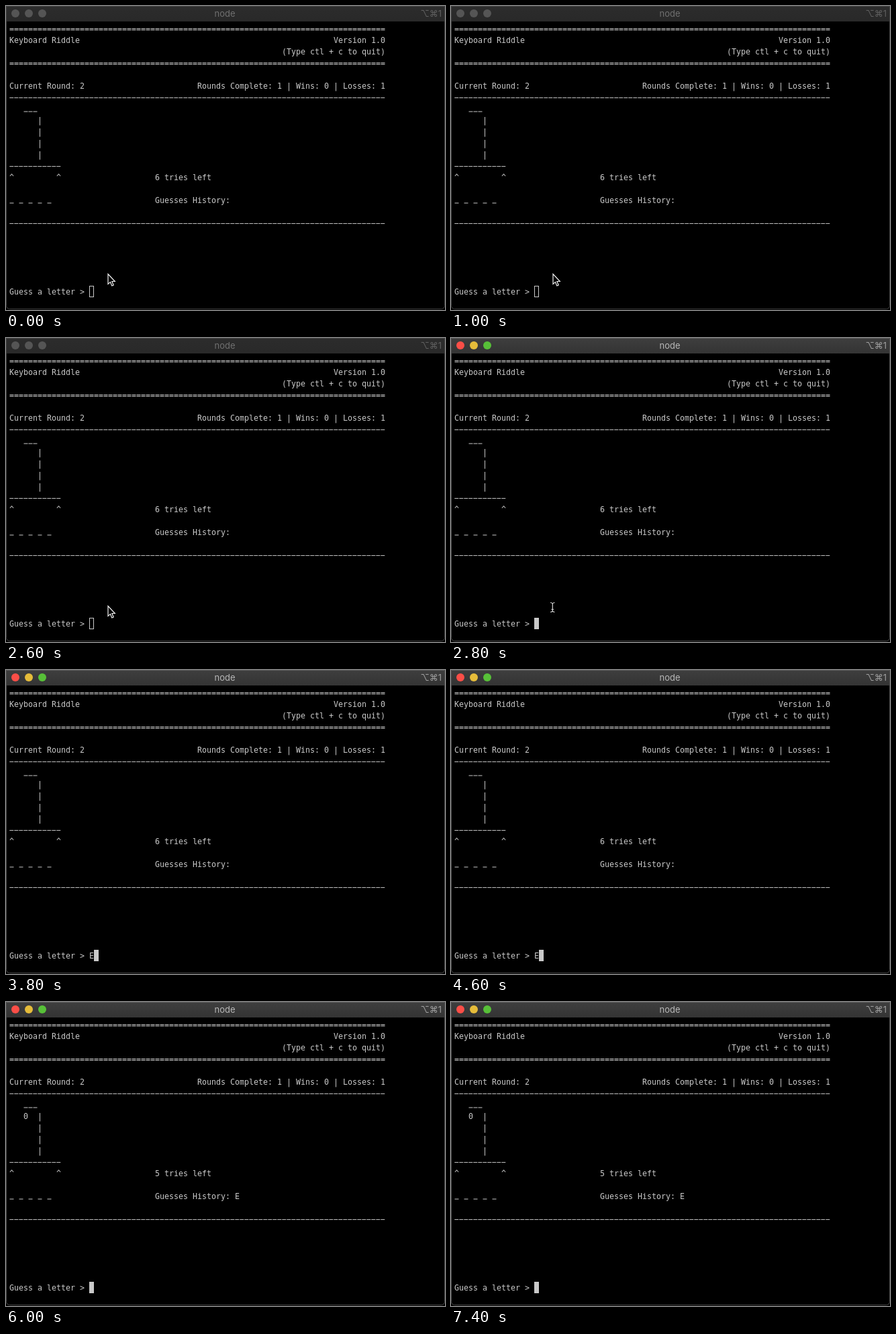
These frames come from a looping animation (654 px wide and 452 px high, 8 s). An HTML page with a canvas:

```html
<!DOCTYPE html>
<html lang="en">
<head>
<meta charset="utf-8">
<title>Terminal word game</title>
<style>
  html, body { margin: 0; width: 100%; height: 100%; overflow: hidden; background: #000; }
  canvas { display: block; }
</style>
</head>
<body>
<canvas id="stage" width="654" height="452"></canvas>
<script>
const ctx = document.getElementById('stage').getContext('2d');
const LOOP = 8000, FOCUS = 2800, TYPE = 3600, ENTER = 4800;
const COLS = 80, CELL = 7, ROW = 17, LEFT = 5, BASE = 38;
const INK = '#c9c9c9';
const PROMPT = 'Guess a letter > ';

const colX = col => LEFT + col * CELL;

// Writes text on the character grid; blanks and rules sit in their own cells.
function write(row, col, text) {
  const y = BASE + row * ROW;
  ctx.fillStyle = INK;
  ctx.font = '11.63px "DejaVu Sans Mono", monospace';
  ctx.textAlign = 'left';
  [...text].forEach((char, i) => {
    const x = colX(col + i);
    if (char === '_') ctx.fillRect(x + 0.5, y - 0.5, 6, 1);
    else if (char !== ' ') ctx.fillText(char === '-' ? '\u2212' : char, x, y);
  });
}

const writeRight = (row, text) => write(row, COLS - text.length, text);
const rule = (row, char) => write(row, 0, char.repeat(COLS));

function drawTitleBar(active) {
  const shade = ctx.createLinearGradient(0, 0, 0, 23);
  shade.addColorStop(0, active ? '#3e3e3e' : '#2c2c2c');
  shade.addColorStop(1, active ? '#343434' : '#292929');
  ctx.fillStyle = shade;
  ctx.fillRect(0, 0, 654, 23);
  ctx.fillStyle = active ? '#5c5c5c' : '#444';
  ctx.fillRect(0, 0, 654, 1);

  ['#fb4e47', '#e5bc3a', '#57c038'].forEach((color, i) => {
    ctx.fillStyle = active ? color : '#555';
    ctx.beginPath();
    ctx.arc(14 + 20 * i, 11, 6, 0, Math.PI * 2);
    ctx.fill();
  });

  ctx.font = '13px Inter, sans-serif';
  ctx.textAlign = 'center';
  ctx.fillStyle = active ? '#b8b8b8' : '#707070';
  ctx.fillText('node', 326, 16);
  ctx.font = '13px Inter, "DejaVu Sans", sans-serif';
  ctx.textAlign = 'right';
  ctx.fillStyle = active ? '#a0a0a0' : '#606060';
  ctx.fillText('\u2325\u23181', 649, 16);
}

function drawScreen(missed) {
  rule(0, '=');
  write(1, 0, 'Keyboard Riddle');
  writeRight(1, 'Version 1.0');
  writeRight(2, '(Type ctl + c to quit)');
  rule(3, '=');
  write(5, 0, 'Current Round: 2');
  writeRight(5, 'Rounds Complete: 1 | Wins: 0 | Losses: 1');
  rule(6, '-');

  write(7, 3, '___');
  for (let row = 8; row < 12; row++) write(row, 6, '|');
  if (missed) write(8, 3, '0');
  write(12, 0, '-'.repeat(11));
  write(13, 0, '^         ^');
  write(13, 31, `${missed ? 5 : 6} tries left`);
  write(15, 0, '_ _ _ _ _');
  write(15, 31, 'Guesses History:' + (missed ? ' E' : ''));
  rule(17, '-');
}

function drawPrompt(typed, active) {
  write(23, 0, PROMPT + typed);
  const x = colX(PROMPT.length + typed.length);
  ctx.fillStyle = ctx.strokeStyle = INK;
  ctx.lineWidth = 1;
  if (active) ctx.fillRect(x, 416, CELL, 17);
  else ctx.strokeRect(x + 0.5, 416.5, 6, 16);
}

function drawArrow() {
  const arrow = new Path2D('M152 398.5V413.5L155.4 410.4L157.8 416L160.2 415L157.8 409.5H162.3Z');
  ctx.fillStyle = '#000';
  ctx.strokeStyle = '#f2f2f2';
  ctx.lineWidth = 1.2;
  ctx.fill(arrow);
  ctx.stroke(arrow);
}

function drawIBeam() {
  ctx.strokeStyle = '#d8d8d8';
  ctx.lineWidth = 1.2;
  ctx.stroke(new Path2D('M148 393.5Q151 393.5 151.3 395.5Q151.6 393.5 154.5 393.5M151.3 395V406M148 407.5Q151 407.5 151.3 405.5Q151.6 407.5 154.5 407.5M149.5 403.5H153'));
}

function drawFrame(active) {
  ctx.strokeStyle = active ? '#4c4c4c' : '#414141';
  ctx.lineWidth = 1;
  ctx.beginPath();
  ctx.roundRect(0.5, -9.5, 653, 460, 5);
  ctx.stroke();
}

function render(now) {
  const t = now % LOOP;
  const active = t >= FOCUS;
  ctx.fillStyle = '#000';
  ctx.fillRect(0, 0, 654, 452);
  drawTitleBar(active);
  drawScreen(t >= ENTER);
  drawPrompt(t >= TYPE && t < ENTER ? 'E' : '', active);
  if (!active) drawArrow();
  else if (t < TYPE) drawIBeam();
  drawFrame(active);
}

const start = performance.now();
function tick() {
  render(performance.now() - start);
  requestAnimationFrame(tick);
}
tick();
</script>
</body>
</html>
```
